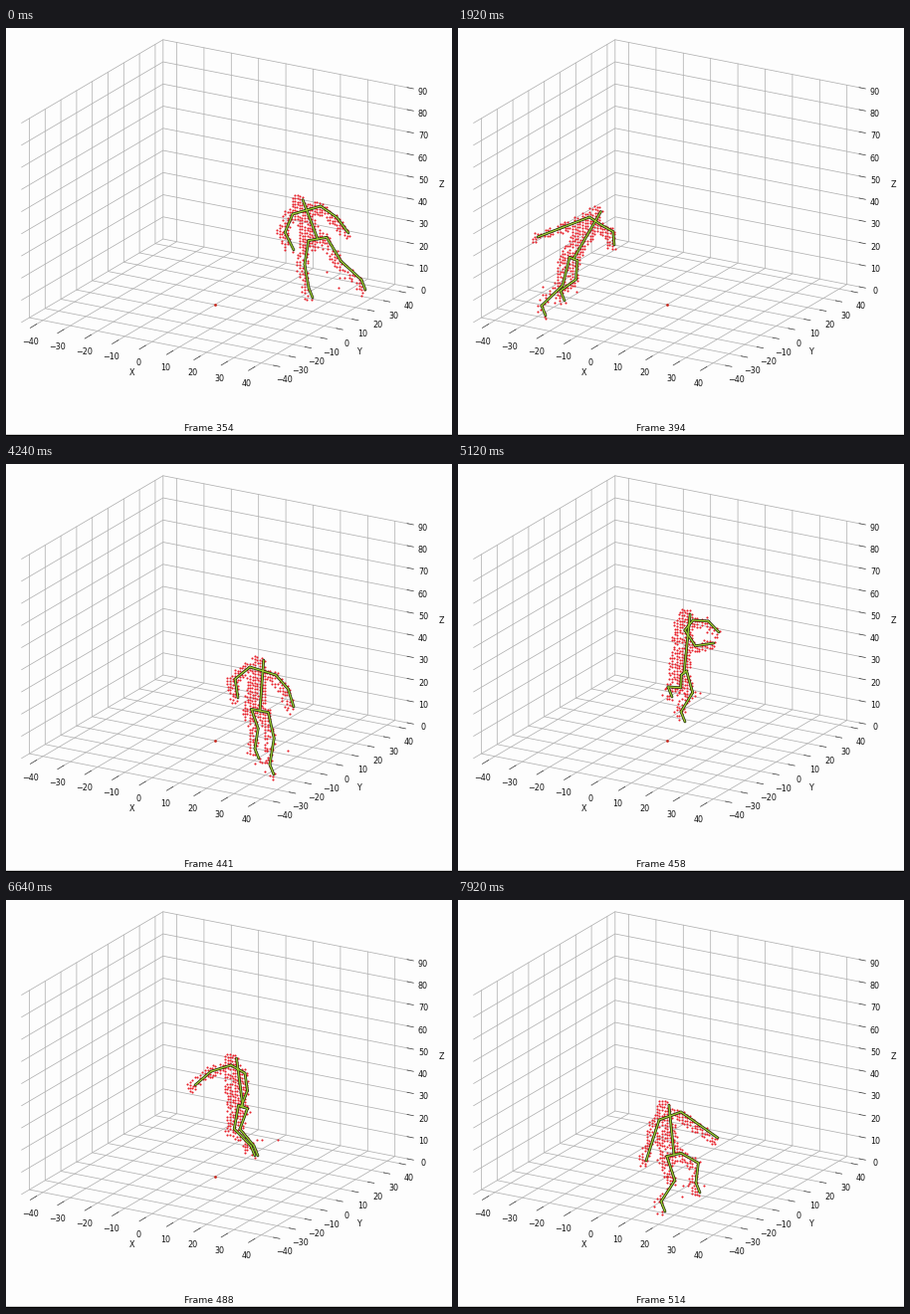
These frames come from a looping animation (448 px wide and 410 px high, 8000 ms). A matplotlib script:

```python
import numpy as np
import matplotlib.pyplot as plt
from matplotlib.animation import FuncAnimation
from matplotlib.collections import LineCollection

W, H, DPI = 448, 410, 64
FRAMES, INTERVAL = 100, 80
PT = 72 / DPI  # points per pixel

plt.rcParams["font.family"] = "DejaVu Sans"
fig = plt.figure(figsize=(W / DPI, H / DPI), dpi=DPI, facecolor="#fdfdfd")
ax = fig.add_axes([0, 0, 1, 1])
ax.set(xlim=(0, W), ylim=(H, 0))
ax.axis("off")


def project(x, y, z=0):
    return 210 + 2.74 * x + 1.58 * y, 278 + 0.536 * x - 0.93 * y - 2.225 * z


def label(x, y, text, size=8.0):
    return ax.text(x, y, text, size=size * PT, ha="center",
                   va="center_baseline", color="#111111")


def lines(segments, color, width, zorder=1):
    group = LineCollection(segments, colors=color, linewidths=width * PT,
                           capstyle="round", zorder=zorder)
    group.set_snap(False)
    return ax.add_collection(group)


def draw_box():
    lo, hi = -45, 45
    grid, ticks = [[project(lo, hi), project(lo, hi, 90)]], []

    def tick(point, dx, dy):
        px, py = point
        ticks.append([(px - 0.3 * dx, py - 0.3 * dy), (px + dx, py + dy)])

    for i, v in enumerate(range(-40, 50, 10)):
        name = str(v).replace("-", "\u2212")
        grid.append([project(v, lo), project(v, hi), project(v, hi, 90)])
        grid.append([project(hi, v), project(lo, v), project(lo, v, 90)])
        tick(project(v, lo), -5, 3)
        tick(project(hi, v), 5, 1)
        label(24.5 + 27.1 * i, 314 + 5.3 * i, name)
        label(280 + 15.6 * i, 353 - 9.25 * i, name)
    for z in range(0, 100, 10):
        grid.append([project(lo, lo, z), project(lo, hi, z), project(hi, hi, z)])
        tick(project(hi, hi, z), 5, 1)
        label(419, 263.6 - 2.225 * z, str(z))
    lines(grid, "#b0b0b0", 0.75)
    lines(ticks, "#333333", 0.7)
    label(127, 345.5, "X")
    label(354, 324.5, "Y")
    label(437.5, 157, "Z")
    ax.plot([0, W], [409, 409], color="black", lw=1.4 * PT)
    ax.plot(*project(0, 0), "o", color="#c8261c", ms=2.8 * PT, mew=0)


# Joint indices; each limb is a run of consecutive joints.
HEAD, CHEST, PELVIS = 0, 1, 2
ARMS = [(3, 4, 5), (6, 7, 8)]
LEGS = [(9, 10, 11, 12), (13, 14, 15, 16)]


def bend(a, b, amount):
    """Middle joint between a and b, pushed sideways."""
    d = b - a
    return (a + b) / 2 + amount * np.array([-d[1], d[0]]) / np.hypot(*d)


def pose(chest, pelvis, half_width, hands, ankles, knee):
    """Build the skeleton from its ends; elbows, hips and head follow."""
    chest, pelvis, half = map(np.array, (chest, pelvis, half_width))
    spine = chest - pelvis
    joints = [chest + 11 * spine / np.hypot(*spine), chest, pelvis]
    for side, hand, flex in zip((-1, 1), np.array(hands), (0.7, -0.35)):
        shoulder = chest + side * half
        slack = np.sqrt(max(0, 21.5 ** 2 - np.sum((hand - shoulder) ** 2) / 4))
        joints += [shoulder, bend(shoulder, hand, flex * slack), hand]
    for side, ankle in zip((-1, 1), np.array(ankles)):
        hip = pelvis + side * half * (0.65, 0.4)
        joints += [hip, bend(hip, ankle, knee), ankle, ankle + (4, 10)]
    return np.array(joints, float)


MOTION = {  # time in ms -> pose
    0: pose((302, 183), (313, 212), (14, -4),
            [(289, 223), (344, 206)], [(304, 261), (357, 253)], 4),
    1920: pose((138, 194), (116, 232), (6, 4),
               [(80, 210), (157, 218)], [(84, 279), (103, 264)], -8),
    2960: pose((209, 214), (217, 251), (13, -3),
               [(162, 246), (260, 238)], [(212, 295), (230, 291)], 2),
    4240: pose((258, 208), (255, 248), (13, 4),
               [(233, 235), (289, 244)], [(250, 286), (265, 302)], -5),
    5120: pose((232, 162), (227, 210), (4, -5),
               [(257, 180), (262, 169)], [(211, 224), (224, 249)], -9),
    6640: pose((233, 170), (238, 208), (7, 4),
               [(190, 186), (236, 208)], [(246, 247), (249, 247)], 11),
    7920: pose((213, 217), (217, 256), (11, -4),
               [(189, 262), (261, 239)], [(204, 303), (239, 284)], -11),
}
TIMES = np.array(list(MOTION))
POSES = np.array(list(MOTION.values()))


def body_at(ms):
    k = min(np.searchsorted(TIMES, ms, side="right"), len(TIMES) - 1)
    u = (ms - TIMES[k - 1]) / (TIMES[k] - TIMES[k - 1])
    body = POSES[k - 1] + u * (POSES[k] - POSES[k - 1])
    leap = 75 * np.sin(np.pi * min(ms / 900, 1))
    return body - (0, leap + 14 * np.sin(np.pi * u))


BONES = [(HEAD, CHEST), (CHEST, PELVIS)]
FLESH = [(HEAD, HEAD, 7.5, 1.0), (HEAD, CHEST, 6, 1.0), (CHEST, PELVIS, 10.5, 1.0)]
for root, limbs, fullness in ((CHEST, ARMS, 0.95), (PELVIS, LEGS, 0.8)):
    for limb in limbs:
        BONES.append((root, limb[0]))
        FLESH.append((root, limb[0], 6.5, 1.0))
        for n, (a, b) in enumerate(zip(limb, limb[1:])):
            BONES.append((a, b))
            FLESH.append((a, b, 5.8 - 0.5 * n, fullness - 0.2 * n))

rng = np.random.default_rng(7)
col, row = np.meshgrid(np.arange(140), np.arange(-26, 95))
lattice = np.stack([60 + 2.5 * col, 50 + 0.5 * col + 3.0 * row], -1).reshape(-1, 2)
lattice += rng.uniform(-0.5, 0.5, lattice.shape)
chance = rng.random(len(lattice))
strays = rng.uniform((-20, -12), (30, 6), (5, 2))
SURFACE = np.array((-3.5, 1.5))  # visible skin lies to this side of the bones


def distance(points, a, b):
    d = b - a
    t = np.clip((points - a) @ d / max(d @ d, 1e-9), 0, 1)
    return np.hypot(*(points - a - t[:, None] * d).T)


def cloud(body):
    skin = body + SURFACE
    skin[[HEAD, CHEST, PELVIS], 0] -= 2
    keep = np.zeros(len(lattice), bool)
    for a, b, radius, fill in FLESH:
        keep |= (distance(lattice, skin[a], skin[b]) < radius) & (chance < 0.9 * fill)
    feet = (body[LEGS[0][2]] + body[LEGS[1][2]]) / 2
    return np.vstack([lattice[keep], feet + strays])


draw_box()
dots, = ax.plot([], [], "o", color="#e8202a", ms=2.1 * PT, mew=0, zorder=3)
outline = lines([], "#1c2408", 2.7, zorder=4)
core = lines([], "#9acd32", 1.3, zorder=5)
caption = label(204, 401.5, "", 9.4)


def update(i):
    body = body_at(i * INTERVAL)
    dots.set_data(*cloud(body).T)
    for group in (outline, core):
        group.set_segments([body[list(bone)] for bone in BONES])
    caption.set_text(f"Frame {354 + int(min(2 * i, 1.59 * i + 2.8))}")
    return dots, outline, core, caption


anim = FuncAnimation(fig, update, frames=FRAMES, interval=INTERVAL,
                     repeat=True, repeat_delay=0, blit=False)
plt.show()
```
